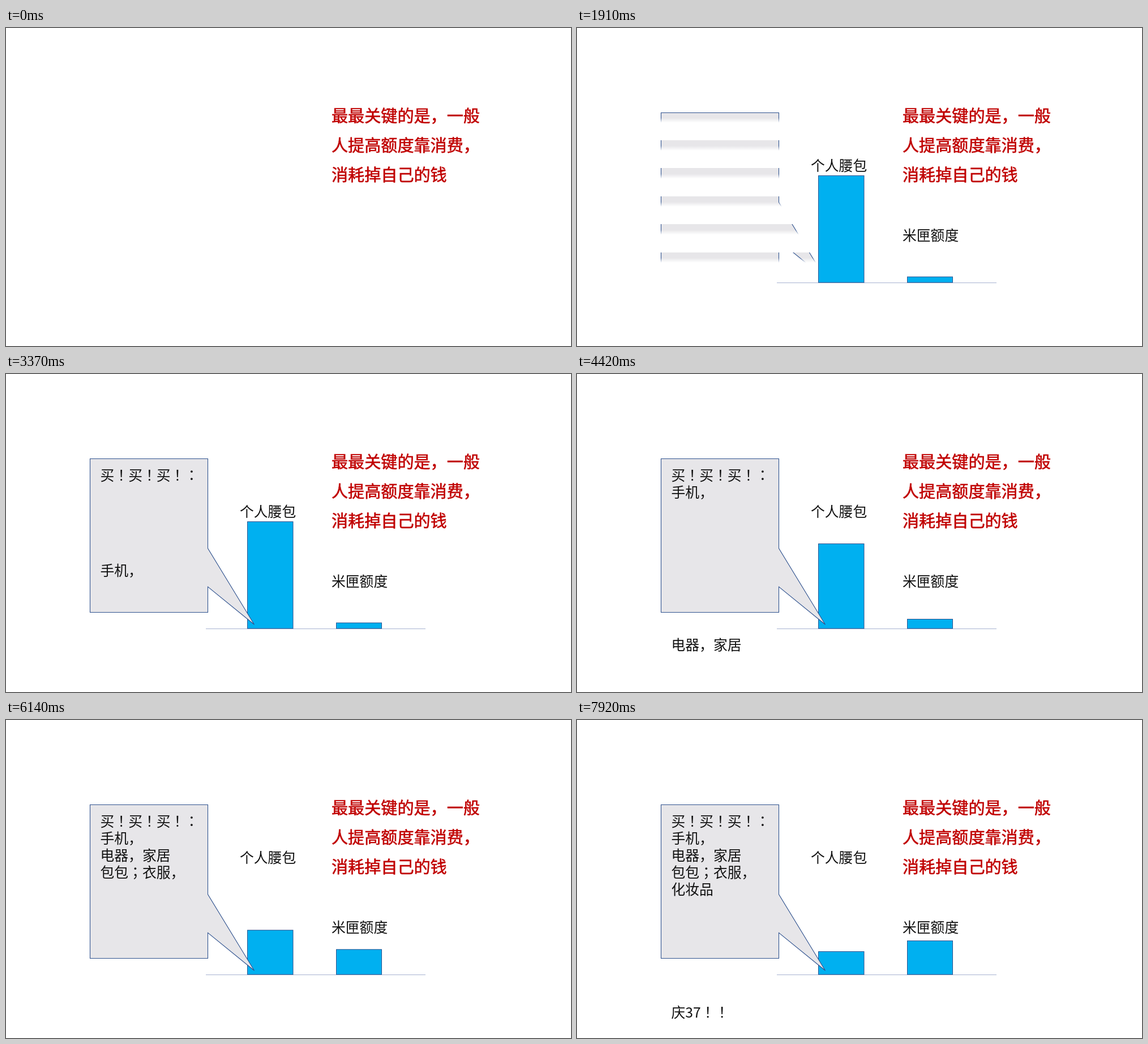
These frames come from a looping animation (998x561 px, 7990 ms). An HTML page:

```html
<!DOCTYPE html>
<html lang="zh-Hans">
<head>
<meta charset="utf-8">
<style>
  html, body { margin: 0; height: 100%; overflow: hidden; background: #fff; }
  svg { display: block; width: 998px; height: 561px; }
  text { font: 300 24.8px "Noto Sans CJK SC", "Noto Sans CJK", sans-serif; fill: #111; text-spacing-trim: space-all; }
  .mid { font-family: "Noto Sans CJK JP", "Noto Sans CJK", sans-serif; }
  .title text { font-size: 29.1px; font-weight: 500; fill: #c00000; stroke: #c00000; stroke-width: 0.6; }
  .bar { fill: #00b0f0; stroke: #2f528f; }
  .bubble { fill: #e7e6e9; stroke: #2f528f; stroke-width: 1.1; }
</style>
</head>
<body>
<svg viewBox="0 0 998 561">
  <defs>
    <linearGradient id="wipe" gradientUnits="userSpaceOnUse" x1="0" y1="451" x2="0" y2="228">
      <stop stop-color="#fff"/><stop stop-color="#000"/>
    </linearGradient>
    <linearGradient id="blinds" gradientUnits="userSpaceOnUse" x1="0" y1="148.6" x2="0" y2="198" spreadMethod="repeat">
      <stop stop-color="#fff"/><stop stop-color="#000"/>
    </linearGradient>
    <mask id="wipeMask" maskUnits="userSpaceOnUse" x="0" y="0" width="998" height="561">
      <rect width="998" height="561" fill="url(#wipe)"/>
    </mask>
    <mask id="blindsMask" maskUnits="userSpaceOnUse" x="0" y="0" width="998" height="561">
      <rect width="998" height="561" fill="url(#blinds)"/>
    </mask>
  </defs>

  <g class="title">
    <text x="575" y="166">最最关键的是，一般</text>
    <text x="575" y="218">人提高额度靠消费，</text>
    <text x="575" y="270">消耗掉自己的钱</text>
  </g>

  <g id="chart">
    <path d="M353 449.5H741" stroke="#a7b3d1"/>
    <rect class="bar" x="426.5" width="80.5"/>
    <rect class="bar" x="583.5" width="80"/>
    <text x="413" y="252">个人腰包</text>
    <text x="575" y="374.5">米匣额度</text>
  </g>

  <path id="bubble" class="bubble" d="M148.5 149.5H356.5V307.6L438.5 442L356.5 375.3V420.5H148.5Z"/>
  <g id="lines"></g>
</svg>

<script>
const LOOP = 7990, FLY = 500, BASE = 449;
const OFFSTAGE = 584;

// text, moment it starts to fly in
const lines = [
  ['买！买！买！：', 2560],
  ['手机，', 3060],
  ['电器，家居', 4277],
  ['包包；衣服，', 5494],
  ['化妆品', 6627],
  ['庆37！！', 7801],
];

// start, duration, and the bar tops reached
const barMoves = [
  [3700, 450, 299.5, 432.5],
  [4777, 400, 360.5, 408.5],
  [5994, 400, 388.5, 398.5],
  [7127, 400, 408.5, 389.5],
];

const byId = id => document.getElementById(id);
const progress = (t, start, length) => Math.min(1, Math.max(0, (t - start) / length));
const mix = (a, b, p) => a + (b - a) * p;

const lineNodes = lines.map(([text]) => {
  const node = document.createElementNS('http://www.w3.org/2000/svg', 'text');
  node.setAttribute('x', 166.5);
  // these marks sit in the middle of their cell
  node.innerHTML = text.replace(/[！：；]/g, '<tspan class="mid" lang="ja">$&</tspan>');
  return byId('lines').appendChild(node);
});
const bars = document.querySelectorAll('.bar');

function reveal(node, name, p, soft) {
  const [solid, clear] = byId(name).children;
  const edge = p * (1 + soft);
  solid.setAttribute('offset', Math.max(0, edge - soft));
  clear.setAttribute('offset', Math.min(1, edge));
  node.style.display = p > 0 ? '' : 'none';
  if (p < 1) node.setAttribute('mask', `url(#${name}Mask)`);
  else node.removeAttribute('mask');
}

function draw(t) {
  reveal(byId('chart'), 'wipe', progress(t, 930, 500), 0.1);
  reveal(byId('bubble'), 'blinds', progress(t, 1752, 500), 0.17);

  const tops = [260.5, 439];
  for (const [start, length, ...goal] of barMoves) {
    const p = progress(t, start, length);
    goal.forEach((top, i) => tops[i] = mix(tops[i], top, p));
  }
  bars.forEach((bar, i) => {
    bar.setAttribute('y', tops[i]);
    bar.setAttribute('height', BASE - tops[i]);
  });

  lineNodes.forEach((node, i) => {
    const p = progress(t, lines[i][1], FLY);
    node.setAttribute('y', mix(OFFSTAGE, 188 + 30 * i, p));
    node.style.display = p > 0 ? '' : 'none';
  });
}

function tick() {
  draw(performance.now() % LOOP);
  requestAnimationFrame(tick);
}
tick();
</script>
</body>
</html>
```
